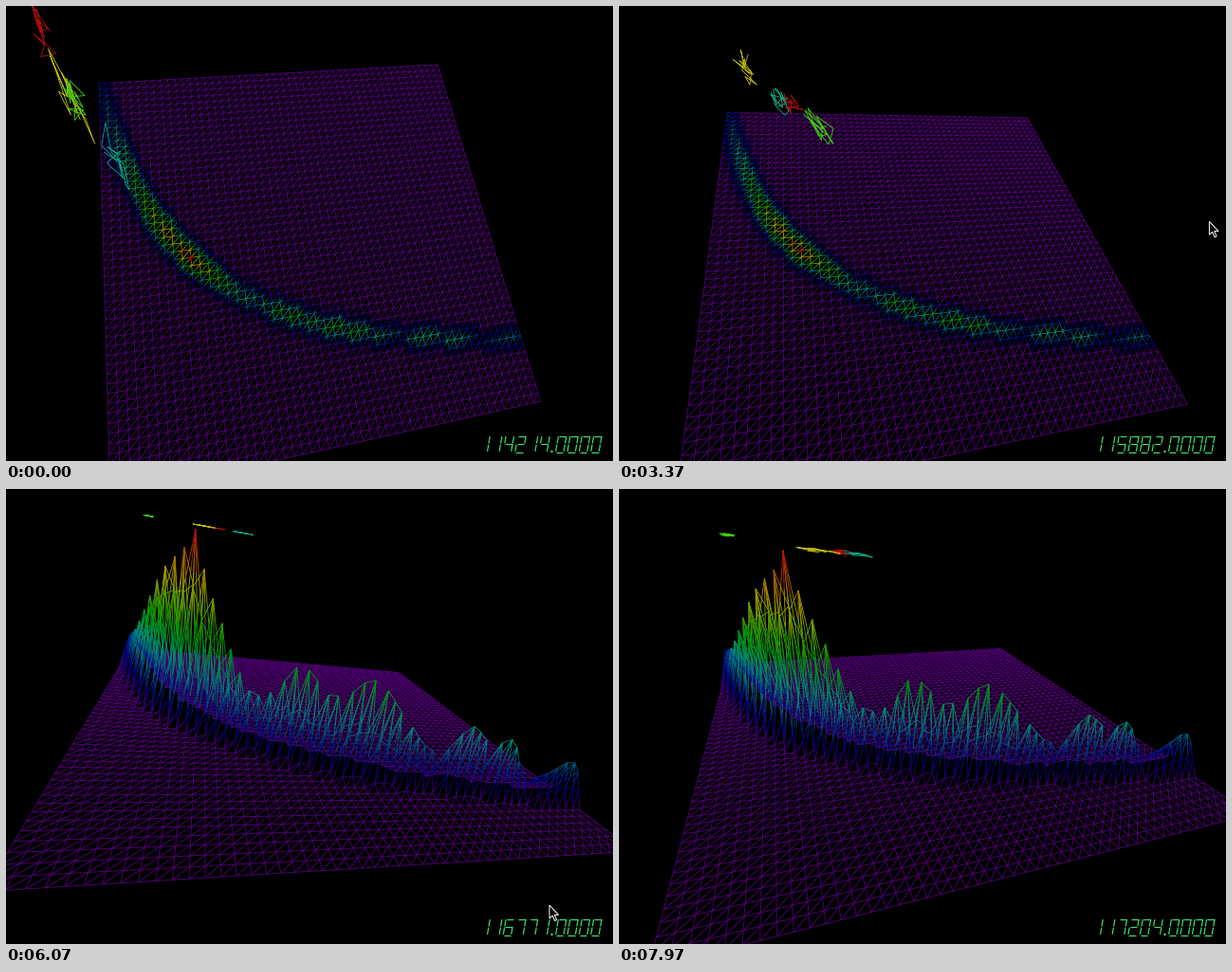
A matplotlib script for the animation above (8010 ms loop, 640 by 480 pixels).

```python
from itertools import groupby

import matplotlib.pyplot as plt
import numpy as np
from matplotlib.animation import FuncAnimation
from matplotlib.collections import LineCollection
from matplotlib.colors import hsv_to_rgb
from matplotlib.patches import Polygon

W, H, LOOP, FRAMES = 640, 480, 8010, 240
FOCAL = H / 2 / np.tan(np.pi / 6)
CENTRE = np.array([W / 2, H / 2])
PX = 0.72             # one pixel in points
N = 50                # grid cells per side
DISTANCE = 2.03       # in half grid widths
SINK = 0.02           # ground lies slightly under the orbit centre
TOP, PLANE = 0.8, 0.82
RAISE = 156           # step at which the flat map becomes a relief

# Step, yaw, pitch, roll (degrees)
ORBIT = np.array([
    (0, 32.2, 71.4, 23.6), (86, 32.2, 71.4, 23.6), (112, 18.1, 36.5, 9.9),
    (130, 18.1, 27.2, 9.9), (181, 17.7, 23.3, 10.2), (200, 41.1, 14.1, 12.1),
    (238, 20.2, 28.0, 3.6)])

COUNT = np.array([(0, 114214), (72, 115650), (112, 115970), (181, 116771),
                  (200, 116832), (238, 117204)])

POINTER = np.array([(86, 638, 300), (112, 611, 174), (130, 612, 161),
                    (181, 573, 439), (200, 617, 443), (214, 640, 445)])

# Hue, value, start, drift and leap along the ridge
TRAILS = [(0.00, 0.66, .05, .24, .08), (0.165, 0.72, .095, .16, -.03),
          (0.29, 0.78, .10, -.01, .20), (0.46, 0.62, .16, .16, -.04)]

# Centre (cells), height and width of the hills along the ridge
HILLS = np.array([
    (9, .70, 4.6), (10, .12, .6), (20.5, .34, 2), (26.5, .37, 2.6),
    (31.5, .17, 2.5), (37, .26, 1.6), (41, .23, 1.6), (46, .1, 2.5),
    (49, .13, 1.6)])


def at(step, keys):
    """Linear interpolation of every column of a key list."""
    return [np.interp(step, keys[:, 0], col) for col in keys.T[1:]]


# ---- camera ----

def camera(step):
    yaw, pitch, roll = np.radians(at(step, ORBIT))
    across = np.array([np.cos(roll), np.sin(roll), 0])
    down = np.array([-np.sin(roll) * np.cos(pitch),
                     np.cos(roll) * np.cos(pitch), np.sin(pitch)])
    near = np.cross(down, across)
    right = np.cos(yaw) * across - np.sin(yaw) * near
    front = np.sin(yaw) * across + np.cos(yaw) * near
    return np.array([right, front, -down]), SINK * down + [0, 0, DISTANCE]


def project(cam, pts):
    basis, origin = cam
    q = pts @ basis + origin
    return CENTRE + FOCAL * q[..., :2] / q[..., 2:]


# ---- relief mesh ----

def ridge(u):
    return 1 - 1 / (1 + 5.45 * u)


def relief():
    i, j = np.mgrid[0:N + 1, 0:N + 1]
    crest = sum(h * np.exp(-0.5 * ((i - c) / w) ** 2) for c, h, w in HILLS)
    slope = 5.45 / (1 + 5.45 * i / N) ** 2
    off = (j - np.round(N * ridge(i / N))) / np.hypot(1, slope)
    val = crest * np.exp(-0.5 * (off / 0.8) ** 2)
    return np.where(val < 0.012, 0, val)


def tint(height):
    level = np.clip(height / TOP, 0, 1)
    hue = 0.78 * (1 - level ** 0.8)
    return hsv_to_rgb(np.stack([hue, np.ones_like(hue), 0.46 + 0.24 * level], axis=-1))


def mesh_lines():
    span = range(N + 1)
    for s in range(1, 2 * N):
        yield [(i, s - i) for i in range(max(0, s - N), min(N, s) + 1)]
    for k in span:
        yield [(k, j) for j in span]
        yield [(i, k) for i in span]


def build_mesh(pieces=4):
    """Long straight lines on the flat, short coloured pieces on the slopes."""
    val = relief()

    def point(ij):
        return 2 * ij[0] / N - 1, 2 * ij[1] / N - 1, val[ij]

    flat, steep = [], []
    for pts in mesh_lines():
        for raised, run in groupby(zip(pts, pts[1:]), lambda e: val[e[0]] + val[e[1]] > 0):
            run = list(run)
            if raised:
                steep += [(point(a), point(b)) for a, b in run]
            else:
                flat.append((point(run[0][0]), point(run[-1][1])))

    steep = np.array(steep)
    w = np.linspace(0, 1, pieces + 1)[:, None]
    chain = steep[:, :1] * (1 - w) + steep[:, 1:] * w
    parts = np.stack([chain[:, :-1], chain[:, 1:]], axis=2).reshape(-1, 2, 3)
    return np.concatenate([flat, parts])


MESH = build_mesh()
FLAT = MESH * [1, 1, 0]


# ---- trails ----

NOISE = np.random.default_rng(7).normal(size=(len(TRAILS), 997, 2))


def trail(k, step, count):
    start, drift, leap = TRAILS[k][2:]
    s = step / FRAMES
    middle = start + drift * s + leap * np.exp(-((s - 0.35) / 0.14) ** 2)
    jitter = NOISE[k, (count + np.arange(-17, 1)) % 997]
    u = np.clip(middle + 0.011 * jitter[:, 0], 0.02, 0.95)
    v = ridge(u) + 0.018 * jitter[:, 1]
    return np.stack([2 * u - 1, 2 * v - 1, np.full_like(u, PLANE)], axis=1)


# ---- seven-segment counter ----

BARS = {"a": (0, 0, 1, 0), "b": (1, 0, 1, 1), "c": (1, 1, 1, 2), "d": (0, 2, 1, 2),
        "e": (0, 1, 0, 2), "f": (0, 0, 0, 1), "g": (0, 1, 1, 1)}
DIGITS = ["abcdef", "bc", "abged", "abgcd", "fgbc", "afgcd", "afgedc", "abc",
          "abcdefg", "abcdfg"]


def digit(ch, x0):
    for name in DIGITS[int(ch)]:
        p = np.array(BARS[name], float).reshape(2, 2)
        p = p.mean(axis=0) + (p - p.mean(axis=0)) * 0.86
        yield [(x0 + 8.4 * x + 1.5 * (2 - y), 453.5 + 8.5 * y) for x, y in p]


def counter(count):
    bars = [[(573.5, y), (576, y)] for y in (469, 470)]
    for k, ch in enumerate(f"{count:06d}"):
        bars += digit(ch, 499 + 12.6 * k)
    for k in range(4):
        bars += digit("0", 579.5 + 12.4 * k)
    return bars


# ---- stage ----

fig = plt.figure(figsize=(W / 100, H / 100), dpi=100, facecolor="black")
ax = fig.add_axes([0, 0, 1, 1])
ax.set(xlim=(0, W), ylim=(H, 0))
ax.axis("off")

mesh = ax.add_collection(LineCollection([], colors=tint(MESH[:, :, 2].mean(axis=1)),
                                        linewidths=0.9 * PX), autolim=False)
paths = [ax.plot([], [], color=hsv_to_rgb((hue, 0.92, value)), lw=0.9 * PX)[0]
         for hue, value, *_ in TRAILS]
digits = ax.add_collection(LineCollection([], colors=[(0.24, 0.88, 0.43)],
                                          linewidths=1.2 * PX), autolim=False)
ARROW = np.array([(0, 0), (0, 14), (3.2, 11), (5.6, 16.5), (7.6, 15.6),
                  (5.3, 10.3), (9.6, 10.3)])
pointer = ax.add_patch(Polygon(ARROW, fc="black", ec="white", lw=PX, zorder=5))


def draw(step):
    cam = camera(step)
    count = int(round(at(step, COUNT)[0]))
    mesh.set_segments(project(cam, MESH if step >= RAISE else FLAT))
    for k, path in enumerate(paths):
        path.set_data(*project(cam, trail(k, step, count)).T)
    digits.set_segments(counter(count))
    pointer.set_visible(POINTER[0, 0] <= step < POINTER[-1, 0])
    pointer.set_xy(ARROW + at(step, POINTER))
    return [mesh, *paths, digits, pointer]


anim = FuncAnimation(fig, draw, frames=FRAMES, interval=LOOP / FRAMES,
                     repeat=True, repeat_delay=0, blit=False)
plt.show()
```
